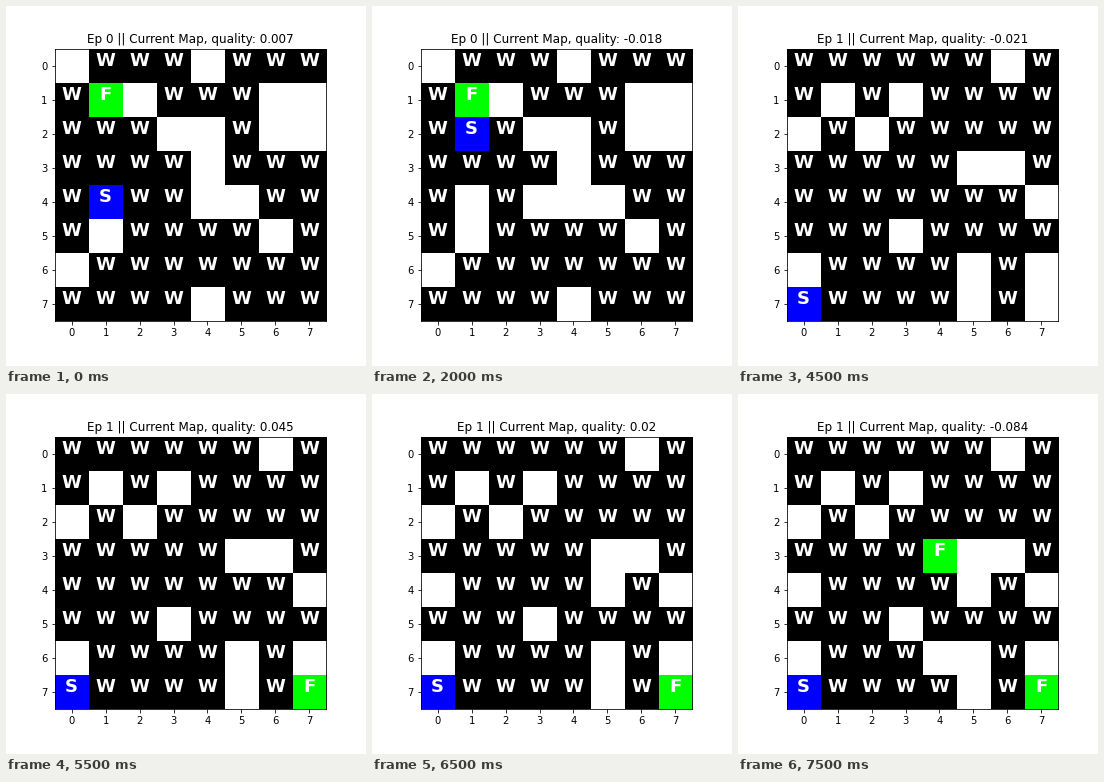
A matplotlib script for the animation above (8 s loop, 360 by 360 pixels).

```python
import matplotlib.pyplot as plt
import numpy as np
from matplotlib.animation import FuncAnimation

SIZE = 8
STEP_MS = 500
COLORS = {".": (1, 1, 1), "W": (0, 0, 0), "F": (0, 1, 0),
          "S": (0, 0, 1), "T": (1, 1, 0)}

MAPS = [
    [".WWW.WWW", "WF.WWW..", "WWW..W..", "WWWW.WWW",
     "WSWW..WW", "W.WWWW.W", ".WWWWWWW", "WWWW.WWW"],
    ["WWWWWW.W", "W.W.WWWW", ".W.WWWWW", "WWWWW..W",
     "WWWWWWW.", "WWW.WWWW", ".WWWW.W.", "SWWWW.W."],
]

# Per episode: (steps shown, quality, edited cell as row, column, tile)
EPISODES = [
    [(2, "0.007", None),
     (1, "-0.047", (2, 1, "S")),
     (1, "-0.032", (4, 1, ".")),
     (1, "-0.018", (4, 3, ".")),
     (1, "1.175", (2, 2, "T")),
     (3, "1.175", "path")],
    [(2, "-0.021", None),
     (1, "0.045", (7, 7, "F")),
     (1, "0.033", (4, 5, ".")),
     (1, "0.02", (4, 0, ".")),
     (1, "0.014", (6, 4, ".")),
     (1, "-0.084", (3, 4, "F"))],
]

# Arrows along the solution: start x, y, end x, y, edge colour
PATH = [(1.1, 2.1, 2.08, 2.1, "yellow"),
        (1.9, 1.9, 1.9, 0.92, "green"),
        (1.9, 0.9, 1.0, 0.9, "green")]


def build_steps():
    steps = []
    for ep, (rows, edits) in enumerate(zip(MAPS, EPISODES)):
        grid = [list(row) for row in rows]
        for count, quality, edit in edits:
            solved = edit == "path"
            if edit and not solved:
                r, c, tile = edit
                grid[r][c] = tile
            title = f"Ep {ep} || Current Map, quality: {quality}"
            state = ["".join(row) for row in grid]
            steps += [(title, state, solved)] * count
    return steps


STEPS = build_steps()

fig = plt.figure(figsize=(5, 5), dpi=72, facecolor="white")
fig.subplots_adjust(left=0.125, right=0.9, bottom=0.125, top=0.88)
ax = fig.add_subplot()


def draw(i):
    title, grid, solved = STEPS[i]
    ax.clear()
    ax.imshow(np.array([[COLORS[t] for t in row] for row in grid], float),
              interpolation="nearest")
    ax.set_xticks(range(SIZE))
    ax.set_yticks(range(SIZE))
    ax.set_title(title, fontsize=12)
    for r, row in enumerate(grid):
        for c, tile in enumerate(row):
            if tile != ".":
                ax.text(c, r, tile, color="white", fontsize=18,
                        weight="bold", ha="center", va="baseline")
    if solved:
        for x0, y0, x1, y1, color in PATH:
            ax.arrow(x0, y0, x1 - x0, y1 - y0, width=0.05, head_width=0.2,
                     head_length=0.2, length_includes_head=True,
                     fc="white", ec=color, lw=1, zorder=4)
    return []


anim = FuncAnimation(fig, draw, frames=len(STEPS), interval=STEP_MS,
                     init_func=lambda: [], repeat=True, repeat_delay=0)
plt.show()
```
